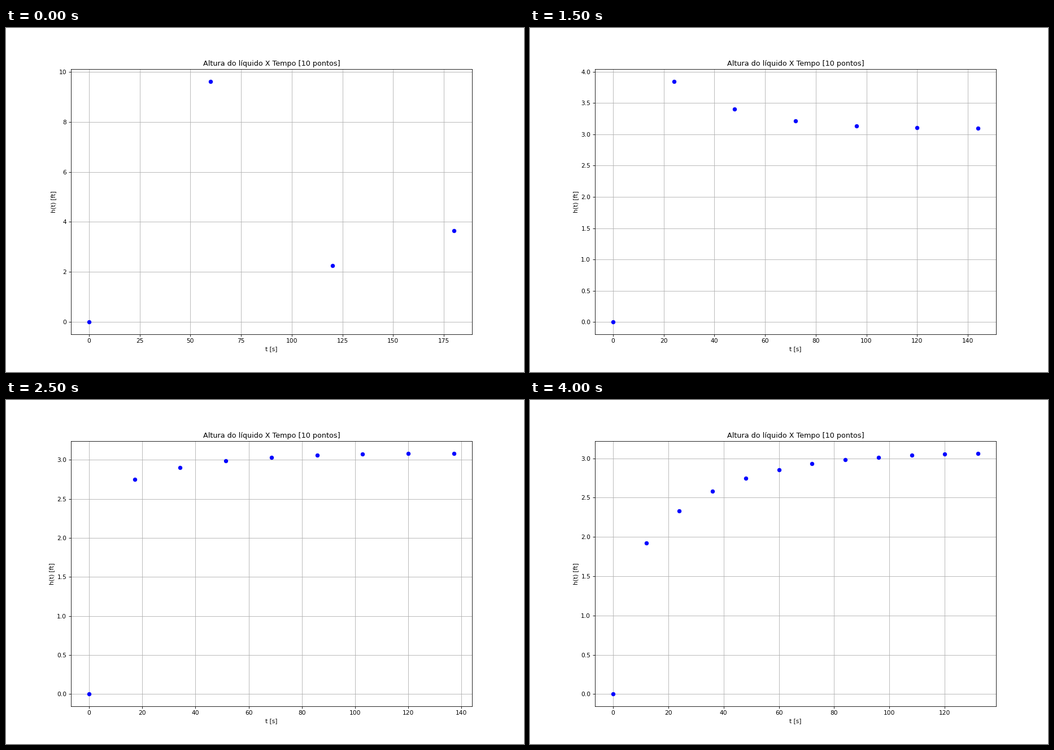
Recreate the animation shown at these times as a matplotlib script. Size 917 by 611 pixels, loop 4.5 s.

```python
import math

import matplotlib.pyplot as plt
import numpy as np
from matplotlib.animation import FuncAnimation

WIDTH, HEIGHT = 917, 611
DPI = WIDTH / 12    # the figure is 12 inches wide
TIME = 120          # simulated time [s]
INFLOW = 10 / 62.4  # level rise from the inlet [ft/s]
OUTFLOW = 0.0912    # outlet coefficient, multiplies sqrt(h)

plt.rcParams["font.family"] = "DejaVu Sans"
fig, ax = plt.subplots(figsize=(12, HEIGHT / DPI), dpi=DPI)


def euler(steps):
    """Liquid height by Euler's method, one step past the final time."""
    dt = TIME / steps
    h = [0.0]
    for _ in range(steps + 1):
        h.append(h[-1] + dt * (INFLOW - OUTFLOW * math.sqrt(h[-1])))
    return np.arange(steps + 2) * dt, h


def draw(i):
    ax.clear()
    t, h = euler(i + 2)
    ax.plot(t, h, "bo")
    ax.set_title("Altura do líquido X Tempo [10 pontos]")
    ax.set_xlabel("t [s]")
    ax.set_ylabel("h(t) [ft]")
    ax.grid(True)
    return ax.lines


anim = FuncAnimation(fig, draw, frames=9, init_func=lambda: draw(0),
                     interval=500, repeat=True, repeat_delay=0)
plt.show()
```
